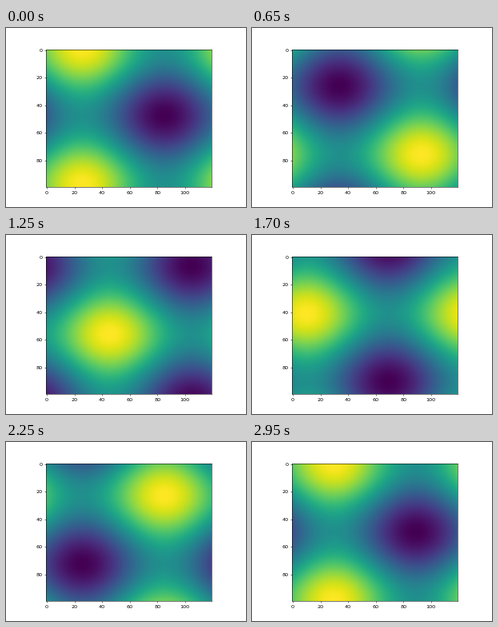
Recreate the animation shown at these times as a matplotlib script. Size 300 by 224 pixels, loop 3000 ms.

```python
import matplotlib.pyplot as plt
import numpy as np
from matplotlib.animation import FuncAnimation

WIDTH, HEIGHT = 300, 224
DPI = WIDTH / 6.4
FRAMES, INTERVAL = 60, 50

x = np.linspace(0, 2 * np.pi, 120)
y = np.linspace(0, 2 * np.pi, 100).reshape(-1, 1)


def field(step):
    """Two crossed waves, with x drifting twice as fast as y."""
    phase = (step + 1) * np.pi / 30
    return np.sin(x + 2 * phase) + np.cos(y + phase)


# The small margin keeps the pixel size from rounding down.
fig, ax = plt.subplots(
    figsize=((WIDTH + 1e-4) / DPI, (HEIGHT + 1e-4) / DPI), dpi=DPI
)
image = ax.imshow(field(0), cmap="viridis")


def update(step):
    image.set_data(field(step))
    image.autoscale()
    return (image,)


anim = FuncAnimation(
    fig, update, frames=FRAMES, interval=INTERVAL, repeat=True, repeat_delay=0
)
plt.show()
```
